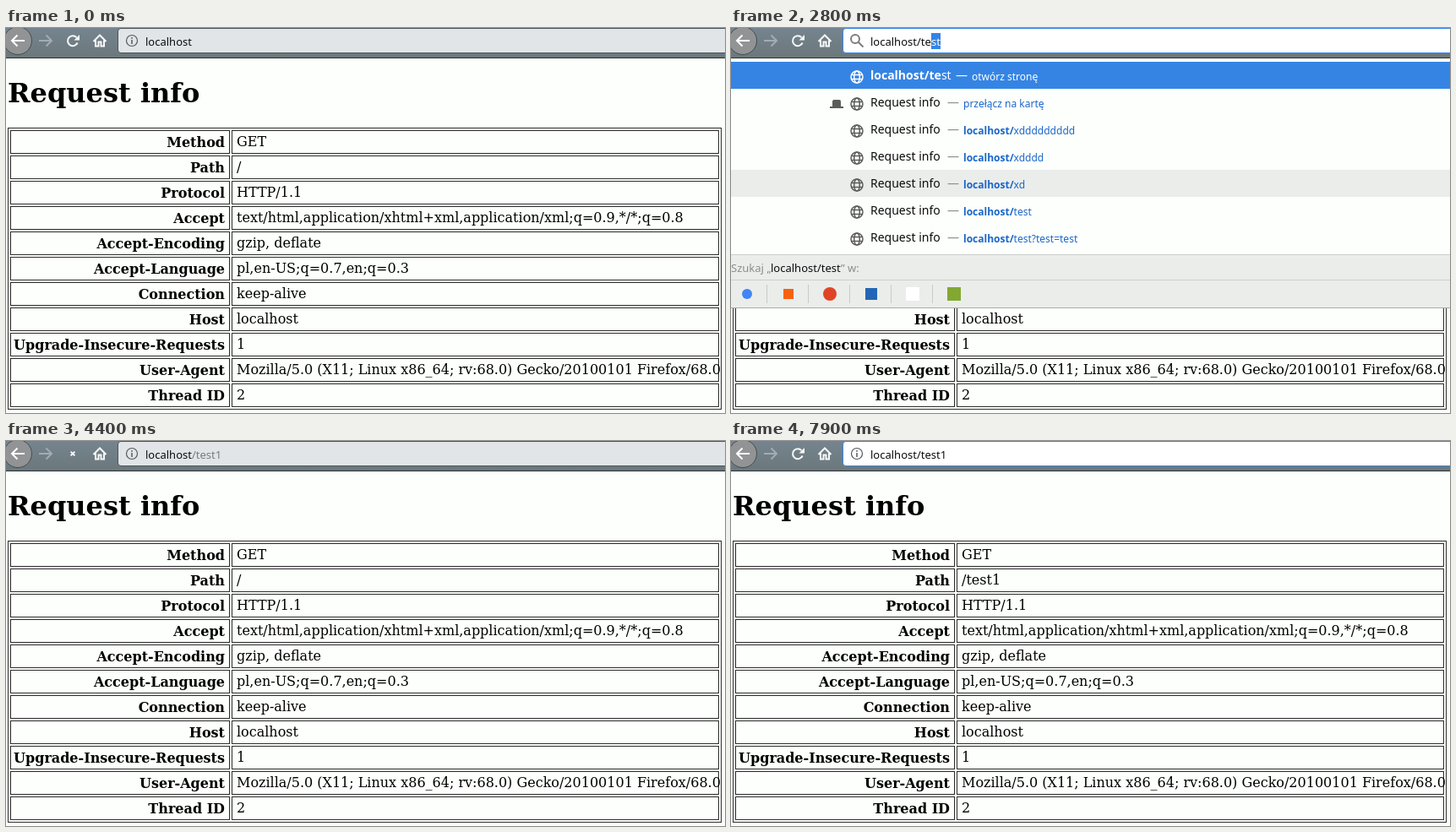
An HTML page for the animation above (8000 ms loop, 851 by 456 pixels).

```html
<!DOCTYPE html>
<html lang="pl">
<head>
<meta charset="utf-8">
<title>Request info</title>
<style>
html, body { margin: 0; width: 100%; height: 100%; overflow: hidden; background: #fdfffc; }
svg { display: block; width: 851px; height: 456px; }
text { white-space: pre; }
.page { font: 16px "DejaVu Serif", serif; fill: #000; }
.page .h1 { font-size: 32px; font-weight: bold; }
.page .th { font-weight: bold; text-anchor: end; }
.grid rect { fill: none; stroke: #2b2b2b; }
.ui { font: 13px "Noto Sans", sans-serif; }
.title { font-size: 14px; }
.link { font-size: 12px; }
.b { font-weight: bold; }
.line { fill: none; stroke-width: 2; }
</style>
</head>
<body>
<svg viewBox="0 0 851 456">
  <defs>
    <linearGradient id="bar" x2="0" y2="1">
      <stop stop-color="#75848f"/><stop offset="1" stop-color="#6b777a"/>
    </linearGradient>
  </defs>
  <rect width="851" height="456" fill="#fdfffc"/>
  <g class="page" id="page"></g>
  <rect width="851" height="36" fill="url(#bar)"/>
  <rect y="35" width="851" height="1" fill="#2a3236"/>
  <circle cx="14" cy="15" r="16.5" fill="#929394" stroke="#454b4f"/>
  <path class="line" stroke="#fff" d="M22 15H7M13.5 8.5L7 15l6.500 6.500"/>
  <path class="line" stroke="#a3acb1" d="M39 15h15M47.500 8.500L54 15l-6.500 6.500"/>
  <path class="line" stroke="#f7f8f8" d="M103.500 16L111 8.500l7.500 7.500M106 14.500v7h3.500v-5h3v5h3.500v-7"/>
  <g id="reload"></g>
  <g class="ui" id="address"></g>
  <g class="ui" id="popup"></g>
</svg>
<script>
const BLUE = '#3584e4', PALE = '#ebedeb', LOOP = 8000;
const $ = id => document.getElementById(id);
const rect = (x, y, w, h, fill) => `<rect x="${x}" y="${y}" width="${w}" height="${h}" fill="${fill}"/>`;
const text = (x, y, body, cls = '', fill = '') =>
  `<text x="${x}" y="${y}" class="${cls}"${fill && ` fill="${fill}"`}>${body}</text>`;
const tint = (body, fill) => `<tspan fill="${fill}">${body}</tspan>`;
// Text between asterisks is bold.
const rich = s => s.split('*').map((part, i) => i % 2 ? `<tspan class="b">${part}</tspan>` : part).join('');

// Page
const headers = [
  ['Method', 'GET'], ['Path', '/'], ['Protocol', 'HTTP/1.1'],
  ['Accept', 'text/html,application/xhtml+xml,application/xml;q=0.9,*/*;q=0.8'],
  ['Accept-Encoding', 'gzip, deflate'], ['Accept-Language', 'pl,en-US;q=0.7,en;q=0.3'],
  ['Connection', 'keep-alive'], ['Host', 'localhost'], ['Upgrade-Insecure-Requests', '1'],
  ['User-Agent', 'Mozilla/5.0 (X11; Linux x86_64; rv:68.0) Gecko/20100101 Firefox/68.0'],
  ['Thread ID', '2']
];

function drawPage({ path }) {
  const box = (x, y, w, h) => rect(x + .5, y + .5, w - 1, h - 1, 'none');
  const rows = headers.map(([name, value], i) => {
    const y = 121 + 30 * i;
    return box(5, y, 260, 28) + box(267, y, 577, 28) +
      text(259, y + 20, name, 'th') + text(273, y + 19, name === 'Path' ? path : value);
  });
  return text(2, 88, 'Request info', 'h1') +
    `<g class="grid">${box(2, 118, 845, 334)}${rows.join('')}</g>`;
}

// Toolbar
function drawReload({ stop, spin, dim }) {
  if (stop) {
    const r = 6 * stop;
    return `<path class="line" stroke="#f7f8f8" d="M${79 - r} ${15 - r}l${2 * r} ${2 * r}m0 ${-2 * r}l${-2 * r} ${2 * r}"/>`;
  }
  return `<g opacity="${dim ? .5 : 1}" transform="rotate(${spin} 79 15)">
    <path class="line" stroke="#f7f8f8" d="M83.500 11.200A6 6 0 1 0 84.600 17.500"/>
    <path fill="#f7f8f8" d="M87 8v6.500h-6.500z"/></g>`;
}

const info = `<circle cx="149" cy="15" r="6.500" fill="none" stroke="#55595c" stroke-width="1.200"/>
  <path stroke="#55595c" stroke-width="1.500" d="M149 11v1.700M149 14v5"/>`;
const lens = `<g class="line" stroke="#7b7d7e"><circle cx="147" cy="13" r="5"/><path d="M150.500 16.500l6 6"/></g>`;

// Left edge of the address text after a given number of characters
const edge = { 0: 165, 9: 219, 10: 224, 12: 237, 13: 243, 14: 248, 15: 256 };

function drawAddress({ url, focus, hover, sel, caret, search }) {
  const end = url.length, from = sel < 0 ? end : sel;
  const fill = focus ? '#fff' : hover ? '#eff1f3' : '#e1e5e8';
  let out = `<rect x="132.500" y=".5" width="730" height="29" rx="3.500" fill="${fill}" stroke="${focus ? BLUE : '#4b5459'}"/>`;
  out += search ? lens : info;
  if (from < end) out += rect(edge[from], 6, edge[end] - edge[from], 19, BLUE);
  const head = url.slice(0, from);
  out += text(165, 21, focus ? head : head.slice(0, 9) + tint(head.slice(9), '#777b7e'), '', '#0c0c0d');
  if (from < end) out += text(edge[from], 21, url.slice(from), '', '#fff');
  if (caret) out += rect(edge[end], 6, 1, 19, '#000');
  return out;
}

// Suggestions
const globe = (y, color) => `<g fill="none" stroke="${color}" stroke-width="1.500">
  <circle cx="149" cy="${y}" r="7"/><ellipse cx="149" cy="${y}" rx="3.300" ry="7"/>
  <path d="M142.500 ${y - 2.5}h13m0 5h-13"/></g>`;
const tabIcon = '<path fill="#5c5c5c" d="M117 93h3v-6q0-2 2-2h6q2 0 2 2v6h3v2h-16z"/>';
const engines = ['#4285f4', '#f7620f', '#de4527', '#2466b5', '#fff', '#82a832'];

function drawRow({ title = 'Request info', link, dash = 256 }, i, hovered) {
  const y = 40 + 32 * i, on = i === 0;
  return (on || hovered ? rect(0, y, 851, 32, on ? BLUE : PALE) : '') +
    globe(y + 18, on ? '#fff' : '#5c5c5c') +
    text(165, y + 21, rich(title), 'title', on ? '#fff' : '#0c0c0d') +
    text(dash, y + 21, '—', 'title', on ? '#fff' : '#8c8c8c') +
    text(dash + 19, y + 22, rich(link), 'link', on ? '#fff' : '#1a66c9');
}

function drawEngine(color, i, y) {
  const x = 19 + 49 * i, r = [6, 6, 8, 7, 8, 8][i];
  return (i ? rect(x - 26, y - 11, 1, 22, '#c9cbc9') : '') +
    (i === 0 || i === 2 ? `<circle cx="${x}" cy="${y}" r="${r}" fill="${color}"/>`
      : rect(x - r, y - r, 2 * r, 2 * r, color));
}

function drawPopup({ rows, size, hot, tab, query }) {
  if (!rows) return '';
  const top = 44 + 32 * size;
  return rect(0, 36, 851, top - 36, '#fdfffc') + rows.map((row, i) => drawRow(row, i, i === hot)).join('') +
    (tab ? tabIcon : '') + rect(0, top, 851, 64, PALE) +
    [0, 30, 63].map(d => rect(0, top + d, 851, 1, d === 63 ? '#a9aba9' : '#cccecc')).join('') +
    text(0, top + 21, 'Szukaj „', '', '#8c8c8c') +
    text(47, top + 21, query + tint('” w:', '#8c8c8c'), '', '#0c0c0d') +
    engines.map((color, i) => drawEngine(color, i, top + 47)).join('');
}

const open = (title, dash = 266) => ({ title, dash, link: 'otwórz stronę' });
const typed = 'localhost/test', final = typed + '1';
const history = ['xddddddddd', 'xdddd', 'xd', 'test', 'test?test=test'];
const allRows = [open('*localhost/te*st'), { link: 'przełącz na kartę' },
  ...history.map(path => ({ link: '*localhost/*' + path }))];

// Each step changes part of the state before it.
const steps = [
  [0, { url: 'localhost', path: '/', sel: -1, spin: 0 }],
  [400, { hover: true }],
  [800, { focus: true, sel: 0 }],
  [1300, { sel: -1, caret: true }],
  [2000, { caret: false }],
  [2400, { url: 'localhost/', caret: true, search: true }],
  [2800, { url: typed, sel: 12, caret: false, rows: allRows, size: 7, hot: 4, tab: true, query: typed }],
  [3000, { sel: 13, rows: [open('*localhost/tes*t'), { link: '*localhost/te*st?test=test' }], hot: -1, tab: false }],
  [3100, { size: 2 }],
  [3200, { sel: -1, caret: true, rows: [open('*localhost/test*'), { link: '*localhost/tes*t?test=test' }] }],
  [3300, { rows: [open('*localhost/test*'), { link: '*localhost/test*?test=test' }] }],
  [3900, { url: final }],
  [4000, { rows: [open('http://*localhost/test1*', 317)], query: final }],
  [4200, { size: 1 }],
  [4400, { rows: null, focus: false, hover: false, caret: false, search: false, stop: .4 }],
  [4500, { stop: .8 }],
  [4600, { stop: 1, path: '/test1' }],
  [4700, { stop: .8 }],
  [4800, { stop: .4 }],
  [4900, { stop: 0, dim: true, spin: -120 }],
  [5000, { spin: -70 }],
  [5100, { spin: -25 }],
  [5200, { spin: 0 }],
  [5400, { dim: false }],
  [6500, { hover: true }],
  [6700, { focus: true }],
  [6800, { sel: 0 }],
  [7300, { sel: -1, caret: true }],
  [7900, { caret: false }]
];
let last = {};
const states = steps.map(([, change]) => last = { ...last, ...change });
const layers = { page: drawPage, reload: drawReload, address: drawAddress, popup: drawPopup };
const start = performance.now();
let shown = -1;

function tick() {
  const t = (performance.now() - start) % LOOP;
  const now = steps.filter(([at]) => at <= t).length - 1;
  if (now !== shown) {
    for (const id in layers) $(id).innerHTML = layers[id](states[now]);
    shown = now;
  }
  requestAnimationFrame(tick);
}
tick();
</script>
</body>
</html>
```
